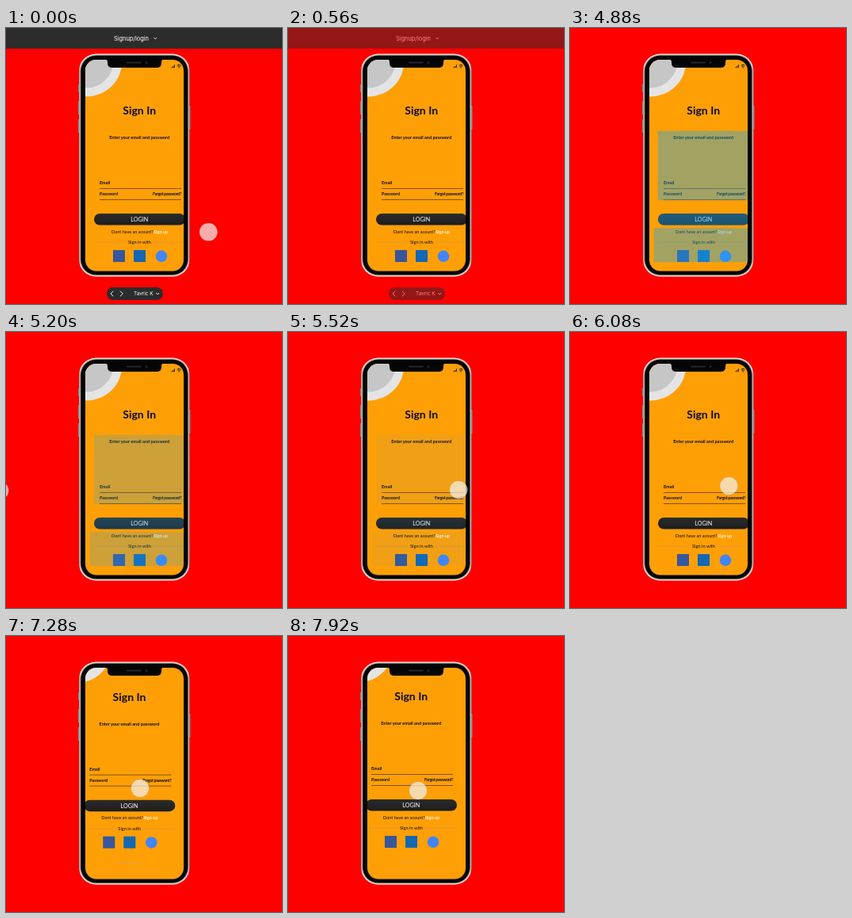
Write an HTML page that moves like this. It is 348 px wide and 348 px high and loops after 8 s.

```html
<!DOCTYPE html>
<html lang="en">
<head>
<meta charset="utf-8">
<title>Sign in prototype</title>
<style>
html, body { margin: 0; width: 100%; height: 100%; overflow: hidden; background: #f00; }
svg { display: block; width: 100vw; height: 100vh; }
.form { font-family: Lato, "Open Sans", sans-serif; fill: #0b0b14; }
.bold { font-weight: 700; }
.mid { text-anchor: middle; }
.ui text { font-family: Inter, sans-serif; fill: #fff; }
.chev { fill: none; stroke: #fff; stroke-width: .9; stroke-linecap: round; stroke-linejoin: round; }
</style>
</head>
<body>
<svg viewBox="0 0 348 348">
  <defs>
    <clipPath id="screen"><rect x="100" y="40" width="124" height="266.500" rx="14"/></clipPath>
    <linearGradient id="metal" x1="0" y1="0" x2="1" y2="0">
      <stop offset="0" stop-color="#8f8a84"/>
      <stop offset=".015" stop-color="#dedad2"/>
      <stop offset=".985" stop-color="#dedad2"/>
      <stop offset="1" stop-color="#8f8a84"/>
    </linearGradient>
    <linearGradient id="dark" x1="0" y1="0" x2="0" y2="1">
      <stop offset="0" stop-color="#2b2b2b"/>
      <stop offset="1" stop-color="#1d1d1d"/>
    </linearGradient>
  </defs>
  <rect width="348" height="348" fill="#f00"/>

  <g id="phone">
    <g fill="#8d8580">
      <rect x="91" y="71" width="2" height="10" rx=".6"/>
      <rect x="91" y="92" width="2" height="17" rx=".6"/>
      <rect x="91" y="115" width="2" height="17" rx=".6"/>
      <rect x="230.500" y="98" width="2" height="30" rx=".6"/>
    </g>
    <rect x="92" y="32.500" width="139.500" height="281" rx="21.500" fill="url(#metal)"/>
    <rect x="93.800" y="34.200" width="136" height="277.600" rx="20" fill="#55504c"/>
    <rect x="94.600" y="34.900" width="134.400" height="276.200" rx="19.400" fill="#050505"/>
    <g clip-path="url(#screen)">
      <rect x="100" y="40" width="124" height="267" fill="#ff9f06"/>
      <g id="content" class="form">
        <circle cx="101.500" cy="41.500" r="45" fill="#e4e4e4"/>
        <circle cx="101.500" cy="41.500" r="34" fill="#c6c6c6"/>
        <path d="M209 50.300v-1.300M210.700 50.300v-2.300M212.400 50.300v-4" stroke="#222" stroke-width="1.100"/>
        <path d="M215.700 47.300q2.400-2.200 4.800 0M216.700 48.700q1.400-1.200 2.800 0" fill="none" stroke="#222" stroke-width="1"/>
        <circle cx="218.100" cy="50" r=".7" fill="#222"/>

        <text class="bold mid" x="168.200" y="109" font-size="14">Sign In</text>
        <text class="bold mid" x="168.200" y="140.200" font-size="5.600">Enter your email and password</text>
        <text class="bold" x="118" y="197" font-size="5.500">Email</text>
        <text class="bold" x="118" y="211" font-size="5.400">Password</text>
        <text class="bold" x="185" y="211" font-size="5.200" letter-spacing="-.3">Forgot password?</text>
        <path d="M118 202.500H221M118 216.500H221" stroke="#5d421c" stroke-width=".8"/>

        <rect x="111" y="234" width="115" height="14.500" rx="7.200" fill="url(#dark)"/>
        <text class="mid" x="168.200" y="243.900" font-size="7.200" fill="#fff">LOGIN</text>
        <text x="133" y="258.500" font-size="5.500">Dont have an acount?</text>
        <text class="bold" x="186" y="258.500" font-size="5.600" fill="#fff4e0">Sign up</text>
        <text class="mid" x="168.500" y="272" font-size="5.700">Sign in with</text>
        <path d="M111 270.300H152M185 270.300H226" stroke="#d69a45" stroke-width=".8"/>

        <rect x="135" y="280" width="15" height="15" fill="#37569b"/>
        <rect x="161" y="280" width="15" height="15" fill="#1467b3"/>
        <circle cx="196" cy="287.800" r="7.300" fill="#4285f4"/>
        <path d="M153 313H181" stroke="#d9a560" stroke-width=".9"/>

        <g id="hints" fill="#18a8f0" stroke="#18a8f0" stroke-width=".6">
          <rect x="111" y="130" width="118" height="87"/>
          <rect x="111" y="234.300" width="115" height="14" rx="7"/>
          <rect x="106" y="252.500" width="123" height="42.500"/>
        </g>
      </g>
    </g>
    <path d="M124 39.500q4 0 4 3v1.500q0 6 6 6h56q6 0 6-6v-1.500q0-3 4-3z" fill="#050505"/>
    <rect x="152" y="42.800" width="19" height="1.600" rx=".8" fill="#2a2a2a"/>
    <circle cx="177" cy="43.600" r="1.500" fill="#1d2230"/>
  </g>

  <g id="bars" class="ui">
    <rect width="348" height="26" fill="#2c2c2c"/>
    <text x="136" y="16" font-size="7.400">Signup/login</text>
    <path class="chev" d="M186.800 12.400l1.500 1.500 1.500-1.500"/>
    <rect x="127" y="327" width="71" height="16" rx="8" fill="#2c2c2c"/>
    <path class="chev" d="M135 332l-3 3 3 3M144.300 332l3 3-3 3M189.500 334.300l1.700 1.700 1.700-1.700"/>
    <text x="161" y="337.300" font-size="6.400">Tavric K</text>
  </g>

  <circle id="cursor" r="11.300" fill="#f3f3f3" fill-opacity=".7" stroke="#a08080" stroke-opacity=".35" stroke-width=".7"/>
</svg>
<script>
const LOOP = 8000, STEP = 80;
const el = id => document.getElementById(id);
const bars = el('bars'), content = el('content'), hints = el('hints'), cursor = el('cursor');
const progress = (t, a, b) => Math.min(1, Math.max(0, (t - a) / (b - a)));

// time, x, y
const path = [
  [5120, -40, 200], [5200, -8, 200], [5360, 112, 201], [5520, 215, 199],
  [5680, 215, 199], [5840, 209, 197], [5920, 209, 197], [6400, 183, 188],
  [6560, 183, 188], [6640, 181, 187], [6720, 181, 187], [6880, 179, 187],
  [7280, 169, 192], [7600, 169, 192], [7920, 164, 195]
];

function cursorAt(t) {
  if (t < 240) return [255.300, 257.200];
  if (t < path[0][0]) return null;
  const i = path.findIndex(k => k[0] > t);
  if (i < 0) return path[path.length - 1].slice(1);
  const [t0, x0, y0] = path[i - 1], [t1, x1, y1] = path[i];
  const p = progress(t, t0, t1);
  return [x0 + (x1 - x0) * p, y0 + (y1 - y0) * p];
}

function draw(time) {
  const t = Math.floor(time / STEP) * STEP;

  bars.setAttribute('opacity', 1 - progress(t, 320, 800));

  const flash = t < 4880 ? 0 : 0.4 * (1 - progress(t, 4880, 5680)) ** 1.2;
  hints.setAttribute('opacity', flash);

  const scroll = 1 - (1 - progress(t, 6880, 7440)) ** 3;
  content.setAttribute('transform', `translate(${-13 * scroll} ${-28 * scroll})`);

  const pos = cursorAt(t);
  cursor.setAttribute('visibility', pos ? 'visible' : 'hidden');
  if (pos) cursor.setAttribute('transform', `translate(${pos[0]} ${pos[1]})`);
}

const start = performance.now();
function tick() {
  draw((performance.now() - start) % LOOP);
  requestAnimationFrame(tick);
}
tick();
</script>
</body>
</html>
```
